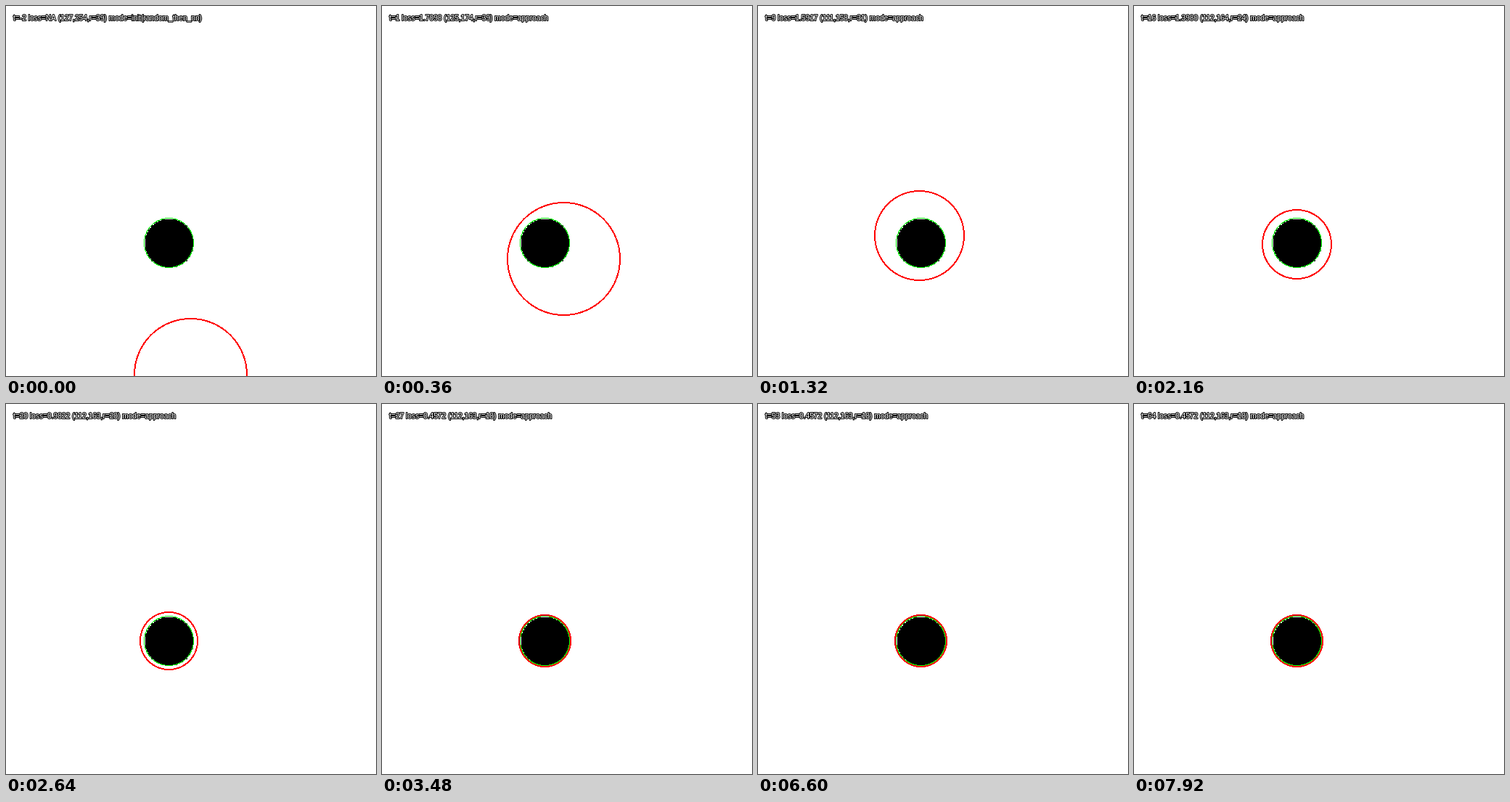
Recreate the animation shown at these times as an HTML page with a canvas. Size 510 by 510 pixels, loop 8000 ms.

```html
<!DOCTYPE html>
<html lang="en">
<head>
<meta charset="utf-8">
<title>Circle fitting</title>
<style>
  html, body { margin: 0; width: 100%; height: 100%; overflow: hidden; background: #fff; }
  canvas { display: block; }
</style>
</head>
<body>
<canvas id="stage" width="510" height="510"></canvas>
<script>
const LOOP = 8000, STEP = 120, SCALE = 2;
const TARGET = { x: 112, y: 163, r: 17 };
const ctx = document.getElementById('stage').getContext('2d');

// step, x, y, radius, loss
const path = [
  [-2, 127, 254, 39, 0],
  [-1, 134, 190, 40, 0],
  [0, 129, 181, 40, 1.7195],
  [2, 120, 167, 38, 1.7002],
  [5, 113, 157, 35, 1.6696],
  [9, 111, 158, 31, 1.5917],
  [12, 111, 162, 28, 1.5314],
  [16, 112, 164, 24, 1.3980],
  [19, 112, 163, 21, 1.2447],
  [22, 112, 163, 18, 0.4572],
];

function stateAt(step) {
  const next = path.findIndex(key => key[0] >= step);
  if (next < 0) return path[path.length - 1].slice(1);
  if (next === 0) return path[0].slice(1);
  const a = path[next - 1], b = path[next];
  const k = (step - a[0]) / (b[0] - a[0]);
  const [x, y, r, loss] = a.map((v, i) => v + (b[i] - v) * k).slice(1);
  return [Math.round(x), Math.round(y), Math.round(r), loss];
}

// Hard-edged ring in stage pixels, centred on the pixel (cx, cy).
function ring(cx, cy, radius, width, color) {
  ctx.fillStyle = color;
  const outer = radius + 0.5, inner = outer - width;
  for (let y = -radius; y <= radius; y++) {
    const end = Math.floor(Math.sqrt(outer * outer - y * y));
    const start = Math.abs(y) > inner ? 0
      : Math.floor(Math.sqrt(inner * inner - y * y)) + 1;
    if (start > end) continue;
    ctx.fillRect(cx + start, cy + y, end - start + 1, 1);
    ctx.fillRect(cx - end, cy + y, end - start + 1, 1);
  }
}

function disc({ x, y, r }) {
  ctx.fillStyle = '#000';
  for (let dy = 1 - r; dy < r; dy++) {
    const half = Math.ceil(Math.sqrt(r * r - dy * dy)) - 1;
    ctx.fillRect((x - half) * SCALE, (y + dy) * SCALE, (2 * half + 1) * SCALE, SCALE);
  }
}

function label(text) {
  ctx.font = '10.2px "Liberation Sans", Arial, sans-serif';
  ctx.lineJoin = 'round';
  ctx.lineWidth = 2;
  ctx.strokeStyle = '#000';
  ctx.fillStyle = '#fff';
  ctx.strokeText(text, 10, 20);
  ctx.fillText(text, 10, 20);
}

function draw() {
  const step = Math.floor(performance.now() % LOOP / STEP) - 2;
  const [x, y, r, loss] = stateAt(step);
  const starting = step < 0;

  ctx.fillStyle = '#fff';
  ctx.fillRect(0, 0, 510, 510);
  disc(TARGET);
  ring(TARGET.x * SCALE, TARGET.y * SCALE, TARGET.r * SCALE, 1, '#0f0');
  ring(x * SCALE, y * SCALE, r * SCALE, 2, '#f00');
  label(`t=${step} loss=${starting ? 'NA' : loss.toFixed(4)} (${x},${y},r=${r}) ` +
    `mode=${starting ? 'init(random_then_nn)' : 'approach'}`);
  requestAnimationFrame(draw);
}
draw();
</script>
</body>
</html>
```
